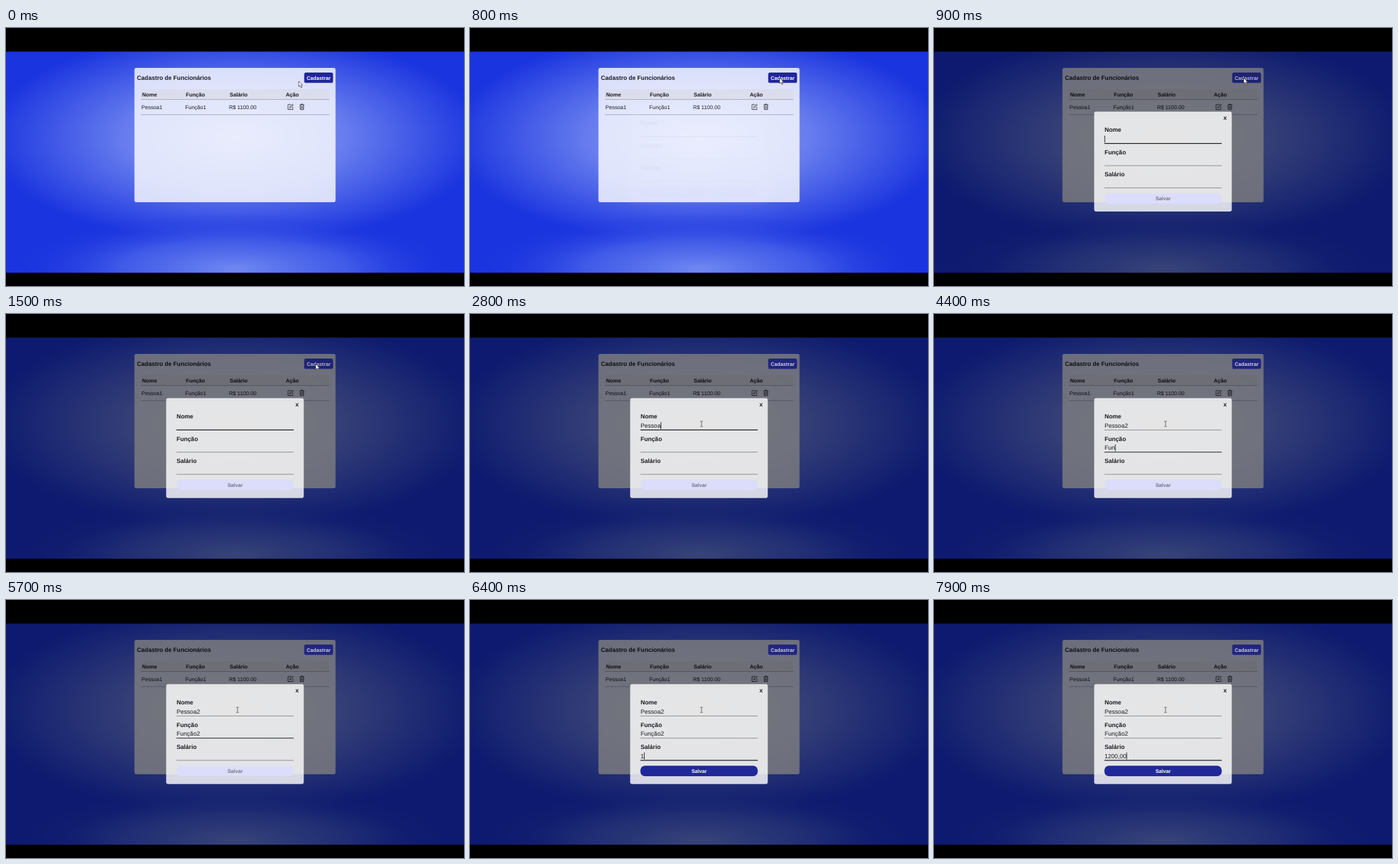
These frames come from a looping animation (690x388 px, 8 s). An HTML page:

```html
<!DOCTYPE html>
<html lang="pt-BR">
<head>
<meta charset="utf-8">
<title>Cadastro de Funcionários</title>
<style>
  html, body { margin: 0; width: 100%; height: 100%; overflow: hidden; background: #000; }
  svg { display: block; width: 100%; height: 100%; }
  text { font-family: "Liberation Sans", Arial, sans-serif; fill: #1c1c24; text-rendering: geometricPrecision; white-space: pre; }
  .bold { font-weight: 700; }
  .t9 { font-size: 9.05px; }
  .t8 { font-size: 8.1px; }
  .button { font-size: 7.7px; font-weight: 700; text-anchor: middle; }
  .icon { fill: none; stroke: #34343e; stroke-width: .9; }
</style>
</head>
<body>
<svg viewBox="0 0 690 388">
  <defs>
    <radialGradient id="wall" gradientUnits="userSpaceOnUse" cx="0" cy="0" r="1" gradientTransform="translate(345 165) scale(375 160)">
      <stop offset="0" stop-color="#8fa0f3"/>
      <stop offset=".45" stop-color="#667cee"/>
      <stop offset="1" stop-color="#1a34df"/>
    </radialGradient>
    <radialGradient id="floor" gradientUnits="userSpaceOnUse" cx="0" cy="0" r="1" gradientTransform="translate(345 362) scale(340 84)">
      <stop offset="0" stop-color="#7089f1"/>
      <stop offset=".5" stop-color="#4a64ea" stop-opacity=".8"/>
      <stop offset="1" stop-color="#1a34df" stop-opacity="0"/>
    </radialGradient>
  </defs>

  <rect width="690" height="388"/>
  <rect y="35.5" width="690" height="332.5" fill="url(#wall)"/>
  <rect y="270" width="690" height="98" fill="url(#floor)"/>

  <g id="page">
    <rect x="193.5" y="60" width="303" height="202" rx="3" fill="#fff" fill-opacity=".8"/>
    <text class="t9 bold" x="197.3" y="78.3">Cadastro de Funcionários</text>
    <rect x="203" y="92" width="284.5" height="15" fill="#d9dae6" fill-opacity=".65"/>
    <path d="M203 107.5H487.5M203 130.3H487.5" stroke="#a4a6b8" stroke-width=".9"/>
    <g class="t8 bold">
      <text x="205" y="102.5">Nome</text>
      <text x="271" y="102.5">Função</text>
      <text x="337" y="102.5">Salário</text>
      <text x="421.5" y="102.5">Ação</text>
    </g>
    <g class="t8">
      <text x="204" y="122">Pessoa1</text>
      <text x="270" y="122">Função1</text>
      <text x="336" y="122">R$ 1100.00</text>
    </g>
    <path class="icon" d="M429.5 115.1H424.9V122.6H432.1V118.6M427.3 120.2L428 118.3L431.6 114.6L432.8 115.8L429.2 119.5Z"/>
    <path class="icon" d="M442.3 115.7H449.3M444.5 115.5V114.4H447.1V115.5M443.2 116V122.7H448.4V116M444.9 117.3V121.5M446.7 117.3V121.5"/>
  </g>

  <rect id="shade" y="35" width="690" height="333" fill-opacity=".5"/>

  <rect id="addBox" x="449.3" y="67" width="43.4" height="15.6" rx="2.6"/>
  <text id="addText" class="button" x="471" y="77.5">Cadastrar</text>

  <g id="modal">
    <rect x="241.3" y="126.5" width="207.3" height="150.2" rx="3" fill="#fff" fill-opacity=".81"/>
    <text class="t9 bold" x="436.1" y="138.8">x</text>
    <g id="fields"></g>
    <rect id="saveBox" x="256.7" y="249.3" width="176.8" height="15.8" rx="7"/>
    <text id="saveText" class="button" x="345.2" y="260">Salvar</text>
    <rect id="caret" width=".9" height="10.4" fill="#111"/>
  </g>

  <path id="arrow" d="M0 0V8.3L2 6.5L3.5 9.8L4.9 9.2L3.5 6H6Z" fill="#fff" stroke="#333" stroke-width=".7"/>
  <path id="beam" d="M-2 -4H-.6L0 -3.5L.6 -4H2M0 -3.5V3.5M-2 4H-.6L0 3.5L.6 4H2" fill="none" stroke="#4c4c50" stroke-width=".8"/>
</svg>

<script>
const LOOP = 8000, FIELD_X = 257, FIELD_GAP = 33.35;
const $ = id => document.getElementById(id);

// Each track is a list of [start time, value...]; the latest entry applies.
const pointer = [[0, 441, 80], [100, 450, 78.5], [200, 461, 76], [300, 466.5, 75.2],
  [1900, 432, 104], [2000, 368, 153], [2100, 348.8, 165.3]];
const opening = [[0, 0, -11], [800, .04, -11], [900, 1, -.7], [1000, 1, 0]];
const focus = [[0, 0], [3600, 1], [6100, 2]];
const caretShown = [[0, 0], [900, 1], [1400, 0], [1900, 1], [3200, 0], [3400, 1], [5700, 0], [6100, 1]];
const fields = [
  { label: "Nome", value: "Pessoa2", keys: [2100, 2200, 2300, 2600, 2700, 2800, 3400] },
  { label: "Função", value: "Função2", keys: [3900, 4300, 4400, 4700, 4900, 5100, 5300] },
  { label: "Salário", value: "1200,00", keys: [6400, 6900, 7000, 7100, 7400, 7800, 7900] }
];

function at(track, t) {
  let current = track[0];
  for (const entry of track) if (entry[0] <= t) current = entry;
  return current.slice(1);
}

function add(name, attributes, content = "") {
  const node = document.createElementNS("http://www.w3.org/2000/svg", name);
  set(node, attributes);
  node.textContent = content;
  return $("fields").appendChild(node);
}

function set(node, attributes) {
  for (const key in attributes) node.setAttribute(key, attributes[key]);
}

fields.forEach((field, i) => {
  const y = i * FIELD_GAP;
  add("text", { class: "t9 bold", x: FIELD_X, y: 157.2 + y }, field.label);
  field.text = add("text", { class: "t9", x: FIELD_X, y: 170.8 + y });
  field.line = add("path", { d: `M256.7 ${174.4 + y}H433.5` });
});

function render(t) {
  const [opacity, shift] = at(opening, t);
  const [active] = at(focus, t);
  const open = t >= 900;
  set($("modal"), { opacity, transform: `translate(0 ${shift})` });
  set($("shade"), { opacity: open ? 1 : 0 });

  const hovered = t < 2000;
  $("addBox").style.fill = !open ? "#20259b" : hovered ? "#1d2274" : "#20257f";
  $("addText").style.fill = !open ? "#fff" : hovered ? "#b4b6c4" : "#ced0df";

  fields.forEach((field, i) => {
    const typed = field.value.slice(0, field.keys.filter(key => key <= t).length);
    if (field.text.textContent !== typed) field.text.textContent = typed;
    set(field.line, i === active
      ? { stroke: "#1c1c20", "stroke-width": 1.2 }
      : { stroke: "#85858b", "stroke-width": .9 });
  });

  const text = fields[active].text;
  const width = text.textContent ? text.getComputedTextLength() : -.3;
  set($("caret"), {
    x: FIELD_X + width + .1,
    y: 162.6 + active * FIELD_GAP,
    opacity: at(caretShown, t)[0]
  });

  const enabled = t >= 6400;
  $("saveBox").style.fill = enabled ? "#20289a" : "#dcddfb";
  $("saveText").style.fill = enabled ? "#fff" : "#77777f";

  const [x, y] = at(pointer, t);
  const typing = t >= 2000;
  set($("arrow"), { transform: `translate(${x} ${y})`, opacity: typing ? 0 : 1 });
  set($("beam"), { transform: `translate(${x} ${y})`, opacity: typing ? 1 : 0 });
}

const start = performance.now();
function tick() {
  render((performance.now() - start) % LOOP);
  requestAnimationFrame(tick);
}
tick();
</script>
</body>
</html>
```
